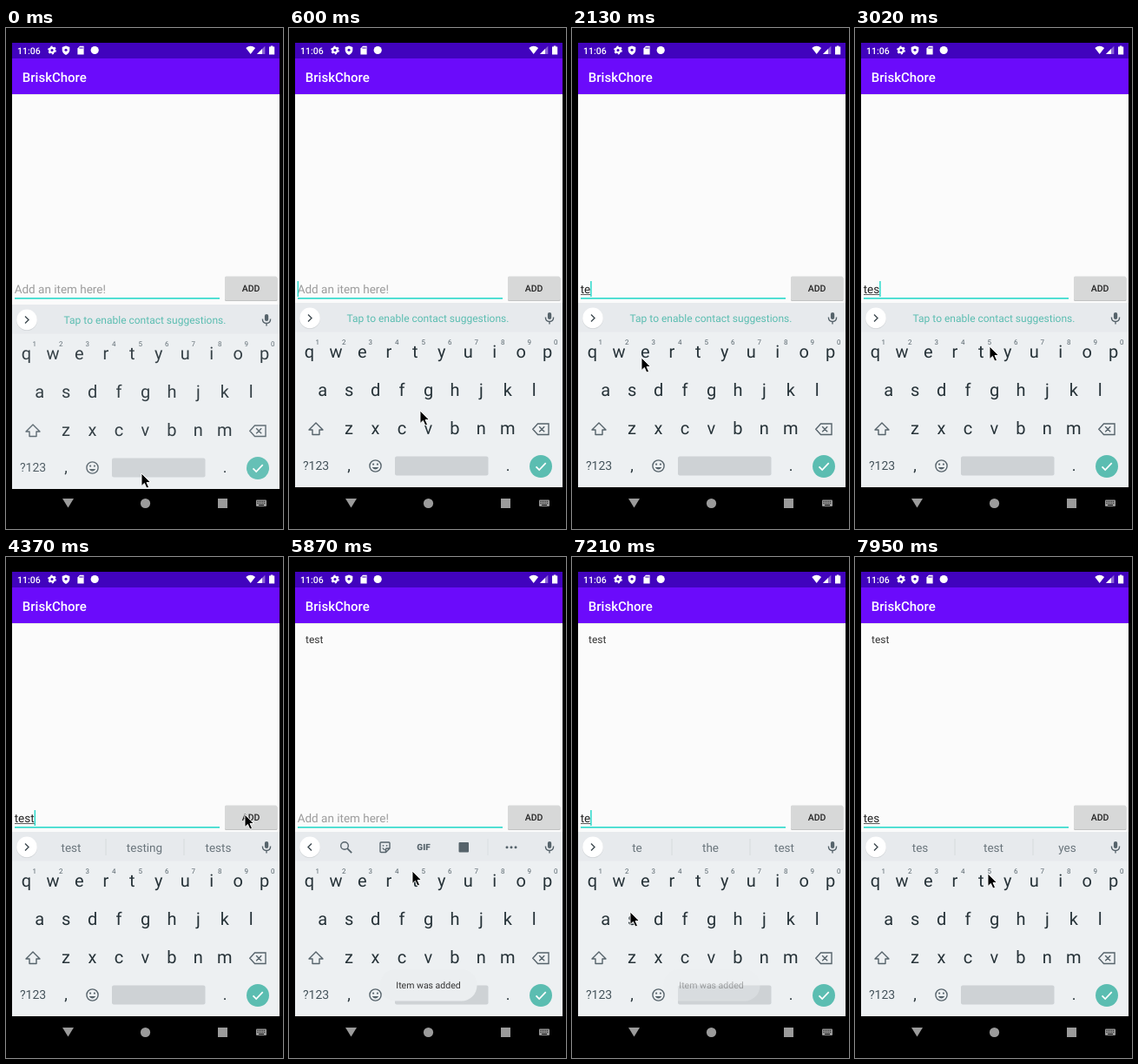
An HTML page that plays this animation: 319 by 576 pixels, repeating every 8000 ms.

```html
<!DOCTYPE html>
<html lang="en">
<head>
<meta charset="utf-8">
<title>To-do list demo</title>
<style>
  html, body { margin: 0; width: 100%; height: 100%; overflow: hidden; background: #000; }
  svg { display: block; width: 319px; height: 576px; font-family: Roboto, "Noto Sans", sans-serif; text-rendering: geometricPrecision; }
  .mid { text-anchor: middle; }
  .line { fill: none; stroke: #56636b; stroke-width: 1.4; }
</style>
</head>
<body>
<svg id="stage" viewBox="0 0 319 576"></svg>
<script>
const LOOP = 8000;
const INK = '#263238', GREY = '#56636b', TEAL = '#5bbdb1';

const label = (x, y, size, fill, str, extra = '') =>
  `<text x="${x}" y="${y}" font-size="${size}" fill="${fill}" ${extra}>${str}</text>`;
const centred = (x, y, size, fill, str, extra = '') =>
  label(x, y, size, fill, str, 'class="mid" ' + extra);
const box = (x, y, w, h, fill, extra = '') =>
  `<rect x="${x}" y="${y}" width="${w}" height="${h}" fill="${fill}" ${extra}/>`;
const dot = (x, y, r, fill, extra = '') =>
  `<circle cx="${x}" cy="${y}" r="${r}" fill="${fill}" ${extra}/>`;
const shape = (d, fill, extra = '') => `<path d="${d}" fill="${fill}" ${extra}/>`;
const line = (d, extra = '') => `<path d="${d}" class="line" ${extra}/>`;

function statusBar() {
  const white = '#fff';
  return box(7, 17, 308, 18, '#4103bd')
    + label(13, 29.5, 10.5, white, '11:06', 'font-weight="500"')
    + dot(53, 25.5, 2.7, 'none', 'stroke="#fff" stroke-width="2.2"')
    + dot(53, 25.5, 4.2, 'none', 'stroke="#fff" stroke-width="1.4" stroke-dasharray="2.2 2.2"')
    + shape('M69 20.5l4.3 1.6v3.2c0 2.6-1.8 4.6-4.3 5.6c-2.5-1-4.3-3-4.3-5.6v-3.2z', white)
    + dot(69, 25.3, 1.5, '#4103bd')
    + shape('M82.4 23.5l2.6-2.7h4.6v9.6h-7.2z', white)
    + shape('M85 22v2M86.6 22v2M88.2 22v2', 'none', 'stroke="#4103bd" stroke-width=".8"')
    + dot(102.2, 25.5, 4.6, white)
    + shape('M276.3 23q5.4-4.4 10.8 0l-5.4 7z', white)
    + shape('M289 30l9.3-9.3v9.3z', white, 'opacity=".4"')
    + shape('M289 30l6-6v6z', white)
    + shape('M303 21.6h1.8v-1.1h2.6v1.1h1.8v8.9h-6.2z', white);
}

function navBar() {
  const grey = '#9b9b9b';
  let keys = box(288, 542.5, 12, 7.5, grey, 'rx="1"');
  for (let i = 0; i < 10; i++) {
    keys += box(289.3 + (i % 5) * 2, 543.8 + Math.floor(i / 5) * 2, 1, 1, '#000');
  }
  return shape('M65 541h13l-6.5 10.5z', grey) + dot(160.5, 546.5, 5.6, grey)
    + box(244, 541, 11, 11, grey) + keys + box(291, 548, 6, 1, '#000');
}

function keyRow(letters, x, y) {
  return [...letters].map((c, i) => centred(x + i * 30.45, y, 20, INK, c)).join('');
}

function keys() {
  const hints = [...'1234567890']
    .map((c, i) => centred(32.8 + i * 30.5, 363.5, 8, GREY, c)).join('');
  return keyRow('qwertyuiop', 23.5, 378.5) + hints
    + keyRow('asdfghjkl', 38.7, 422.5) + keyRow('zxcvbnm', 69, 467)
    + line('M31 454l-8 8h4v5.5h8v-5.5h4z', 'stroke-linejoin="round"')
    + line('M286.5 455h12.5v12.5h-12.5l-5.7-6.2zM288.2 458.2l6 6M294.2 458.2l-6 6')
    + label(16, 508, 14, '#45535b', '?123')
    + centred(69, 509, 18, INK, ',') + centred(252, 509, 18, INK, '.')
    + dot(99.5, 503.5, 6.6, 'none', 'class="line"')
    + dot(97.1, 501.6, 1.1, GREY) + dot(101.9, 501.6, 1.1, GREY)
    + shape('M95.7 505h7.6q-3.8 5-7.6 0z', GREY)
    + box(122, 492.5, 107.5, 22, '#ced2d5', 'rx="2"')
    + dot(290, 504, 13, TEAL)
    + line('M284.5 504.3l3.7 3.7l7.5-7.8', 'style="stroke:#fff;stroke-width:1.7"');
}

function tools() {
  return dot(64, 332, 4.3, 'none', 'class="line"') + line('M67.2 335.2l5 5', 'style="stroke-width:1.8"')
    + line('M106 328h9q1 0 1 1v6l-4.5 4.5h-5.500q-1 0-1-1v-9.500q0-1 1-1zM116 335h-3.500q-1 0-1 1v3.500M107.800 334.500q1 2 2.800 2', 'stroke-linejoin="round"')
    + dot(108.5, 331.8, .9, GREY) + dot(112.6, 331.8, .9, GREY)
    + centred(155, 337.3, 10, GREY, 'GIF', 'font-weight="900"')
    + box(195.5, 328, 11.5, 11.5, GREY, 'rx="1"')
    + box(228.500, 324, 1, 19, '#dadee1')
    + [251, 256, 261].map(x => dot(x, 333.7, 1.5, GREY)).join('');
}

function keyboard() {
  const words = [75, 159.5, 244.5].map(x => centred(x, 339, 13.5, '#6a757c', '', 'data-word')).join('');
  return box(7, 316, 308, 212, '#edf0f2') + box(7, 316, 308, 33.5, '#e7eaed')
    + dot(24, 334, 12, '#cfd3d6') + dot(24, 333.4, 11.8, '#fff')
    + line('M22 329.400l4 4l-4 4', 'id="chevron" style="stroke:#3e4a51"')
    + box(297.900, 327, 4.300, 8, GREY, 'rx="2.1"')
    + line('M295.400 332.500q0 5 4.600 5t4.600-5M300 337.500v3')
    + `<g id="hint">${centred(160, 338, 12, TEAL, 'Tap to enable contact suggestions.')}</g>`
    + `<g id="words">${words}${box(114.500, 324, 1, 19, '#d5d9dc')}${box(204.500, 324, 1, 19, '#d5d9dc')}</g>`
    + `<g id="tools">${tools()}</g><g id="keys">${keys()}</g>`;
}

document.getElementById('stage').innerHTML =
  box(7, 76, 308, 452, '#fbfbfb')
  + box(7, 76, 308, 1, '#e4e2e8')
  + statusBar() + box(7, 35, 308, 41, '#6b0bfb')
  + label(18.8, 61.500, 15, '#fff', 'BriskChore', 'font-weight="500"')
  + label(19, 99, 12, '#333', 'test', 'id="item"')
  + label(9.700, 305, 13.500, '#9c9c9c', 'Add an item here!', 'id="placeholder"')
  + label(9.700, 305, 13.500, '#222', '', 'id="entry"')
  + box(10, 306.200, 0, .8, '#333', 'id="composing"')
  + box(10, 310, 236, 1.600, '#2bd9cb')
  + box(0, 291, 1.500, 18, '#2bd9cb', 'id="caret"')
  + box(252, 286.500, 60.500, 27.500, '#c2c3c3', 'rx="1.5"')
  + box(252, 285.500, 60, 27.500, '#d7d8d8', 'rx="1.5" id="button"')
  + centred(282, 303, 10.500, '#222', 'ADD', 'font-weight="500"')
  + navBar()
  + `<g id="keyboard">${keyboard()}</g>`
  + `<g id="toast">${box(105, 474, 111.500, 36.500, '#ebeef0', 'rx="18"')}${centred(160.500, 496, 10.500, '#333', 'Item was added')}</g>`
  + shape('M0 0v14.500l3.400-3.100l2.500 5.600l2.600-1.100l-2.500-5.400h4.500z', '#000',
      'id="pointer" stroke="#fff" stroke-width=".9"');

const el = {};
document.querySelectorAll('[id]').forEach(node => el[node.id] = node);
const wordNodes = [...document.querySelectorAll('[data-word]')];

// Bursts of screen updates: start, end, count.
const bursts = [[0, 0, 1], [150, 1050, 7], [1200, 1800, 5], [2130, 3170, 8], [3320, 4220, 7],
  [4370, 4370, 1], [4970, 5870, 7], [6020, 7060, 8], [7210, 7950, 6]];
const ticks = bursts.flatMap(([from, to, n]) =>
  Array.from({ length: n }, (_, i) => Math.round((from + (n > 1 ? i * (to - from) / (n - 1) : 0)) / 10) * 10));

// Entry states: time, typed text, suggestion strip.
const states = [
  [-600, '', 'hint'], [1200, 't', 'hint'], [2130, 'te', 'hint'], [2580, 'tes', 'hint'],
  [3320, 'test', 'test testing tests'], [5120, '', 'tools'],
  [6170, 't', 't thanks thank'], [6910, 'te', 'te the test'], [7360, 'tes', 'tes test yes'],
];

// Pointer tip: time, x, y.
const route = [
  [0, 156, 512], [150, 157, 533], [300, 156, 530], [600, 151, 440], [900, 147, 373], [1050, 148, 367],
  [1200, 148, 367], [1350, 138, 370], [1650, 82, 377], [1800, 80, 379],
  [2130, 80, 379], [2430, 66, 411], [2580, 66, 413], [2870, 138, 376], [3020, 155, 366],
  [3320, 156, 366], [3470, 166, 361], [4070, 273, 299], [4220, 275, 296],
  [5270, 275, 296], [5420, 262, 303], [5720, 155, 354], [5870, 142, 361],
  [6170, 142, 362], [6470, 86, 370], [6610, 80, 371], [6910, 80, 373],
  [7210, 67, 408], [7360, 66, 411], [7510, 82, 402], [7810, 147, 367], [7950, 153, 364],
];

const latest = (list, t, time) => list.reduce((found, item) => time(item) <= t ? item : found, list[0]);
const clamp = v => Math.max(0, Math.min(1, v));
const show = (node, on) => node.setAttribute('visibility', on ? 'visible' : 'hidden');

function pointerAt(t) {
  const i = route.findIndex(p => p[0] > t);
  if (i < 0) return route[route.length - 1].slice(1);
  const [t0, x0, y0] = route[i - 1], [t1, x1, y1] = route[i];
  const k = (t - t0) / (t1 - t0);
  return [x0 + (x1 - x0) * k, y0 + (y1 - y0) * k];
}

function render(ms) {
  const t = latest(ticks, ms, v => v);
  const [since, typed, strip] = latest(states, t, s => s[0]);
  const isWords = strip !== 'hint' && strip !== 'tools';

  el.entry.textContent = typed;
  const width = typed ? el.entry.getComputedTextLength() : 0;
  el.composing.setAttribute('width', width);
  el.caret.setAttribute('x', 9.6 + width);
  show(el.caret, (t - since) % 1000 < 500);
  show(el.placeholder, !typed);
  show(el.item, t >= 5120);
  el.button.setAttribute('fill', t === 4970 ? '#c6c7c7' : '#d7d8d8');

  show(el.hint, strip === 'hint');
  show(el.tools, strip === 'tools');
  show(el.words, isWords);
  if (isWords) strip.split(' ').forEach((word, i) => wordNodes[i].textContent = word);
  el.chevron.setAttribute('transform', strip === 'tools' ? 'rotate(180 24 333.4)' : '');

  const settling = t < 150;
  el.keyboard.setAttribute('transform', `translate(0 ${settling ? 2 : 0})`);
  el.keys.setAttribute('opacity', settling ? 0.92 : 1);
  el.toast.setAttribute('opacity', Math.min(clamp((t - 5120) / 300), clamp((7360 - t) / 400)));
  el.pointer.setAttribute('transform', `translate(${pointerAt(t).map(Math.round).join(' ')})`);
}

const start = performance.now();
function loop() {
  render((performance.now() - start) % LOOP);
  requestAnimationFrame(loop);
}
loop();
</script>
</body>
</html>
```
